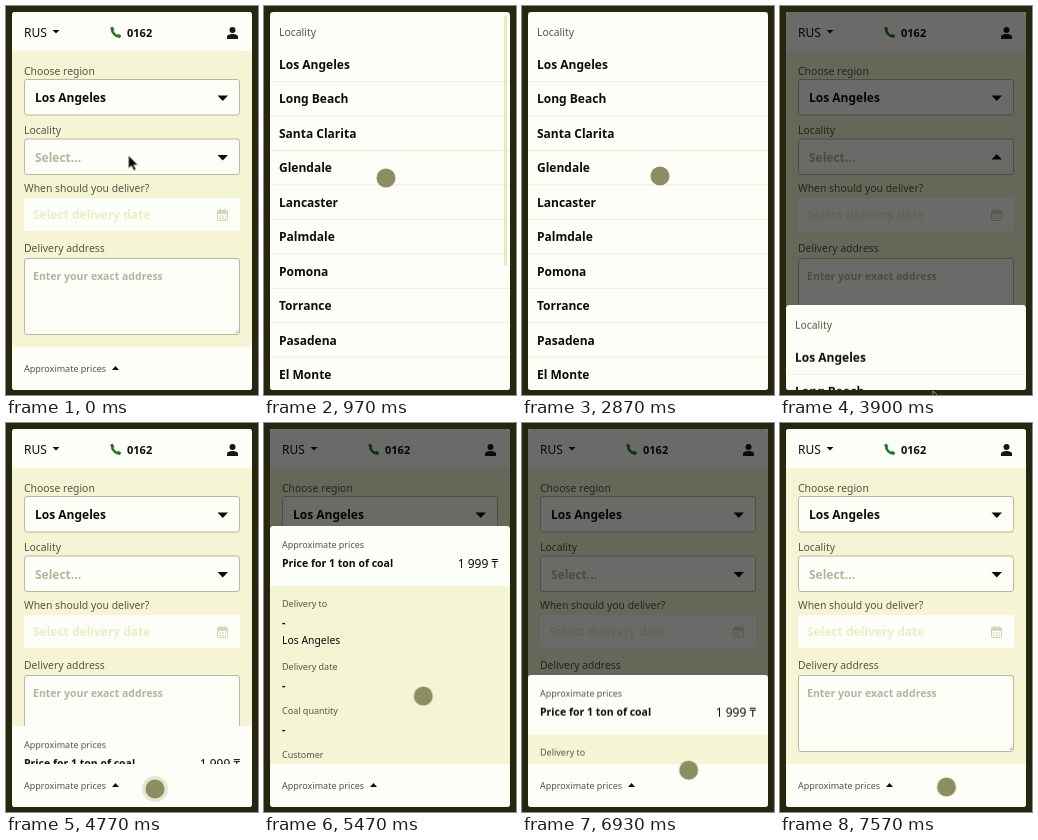
An HTML page for the animation above (7.76 s loop, 252x389 px).

```html
<!DOCTYPE html>
<html lang="en">
<head>
<meta charset="utf-8">
<title>Delivery form</title>
<style>
  html, body { margin: 0; width: 100%; height: 100%; overflow: hidden; background: #27270f; }
  svg { display: block; width: 252px; height: 389px; font-family: "Noto Sans", "Open Sans", sans-serif; }
  .page { fill: #f5f5d6; }
  .card { fill: #fefef8; }
  .box { fill: #fefef8; stroke: #b8b89a; }
  .ink { fill: #0c0c08; }
  .label { font-size: 10.4px; fill: #555546; }
  .small { font-size: 9px; fill: #555546; }
  .big { font-size: 12px; }
  .mid { font-size: 10.5px; }
  .bold { font-weight: 700; }
  .hint { fill: #b4b4a0; }
  .faint { fill: #ececc8; }
  .row { stroke: #efefd2; }

  .list, .price, .shade, .cursor, .arrow, .dot, .halo, .ring, .bar, .up, .down {
    animation: 7760ms linear infinite both;
  }
  .list { animation-name: list; }
  .price { animation-name: price; }
  .list-shade { animation-name: list-shade; }
  .price-shade { animation-name: price-shade; }
  .bar { animation-name: bar; }
  .cursor { animation-name: move; }
  .arrow { animation-name: arrow; animation-timing-function: step-end; }
  .dot { animation-name: dot; animation-timing-function: step-end; }
  .up { animation-name: up; animation-timing-function: step-end; }
  .down { animation-name: down; animation-timing-function: step-end; }
  .halo { animation-name: halo; }
  .ring { animation-name: ring; }

  /* Sheets: slide in, get dragged down, then finish closing */
  @keyframes list {
    0%, 5.15% { transform: translateY(378px); animation-timing-function: ease; }
    9.66%, 41.24% { transform: translateY(0); animation-timing-function: ease-in; }
    48.71% { transform: translateY(200px); }
    50.26% { transform: translateY(292px); animation-timing-function: ease-out; }
    52.19%, 100% { transform: translateY(378px); }
  }
  @keyframes price {
    0%, 60.6% { transform: translateY(238px); animation-timing-function: ease; }
    67.04%, 81.6% { transform: translateY(0); animation-timing-function: ease-in-out; }
    91.49% { transform: translateY(165px); animation-timing-function: ease-out; }
    97.16%, 100% { transform: translateY(238px); }
  }
  @keyframes list-shade {
    0%, 5.15% { opacity: 0; }
    9.02%, 50.3% { opacity: .58; }
    53.48%, 100% { opacity: 0; }
  }
  @keyframes price-shade {
    0%, 61.5% { opacity: 0; }
    65.72%, 91.49% { opacity: .58; }
    97.16%, 100% { opacity: 0; }
  }
  @keyframes bar {
    0%, 16.75% { opacity: 1; }
    20.6%, 100% { opacity: 0; }
  }
  @keyframes move {
    0%, 2.58% { transform: translate(122.5px, 149.5px); animation-timing-function: ease-in-out; }
    10.5%, 12.5% { transform: translate(122px, 172px); animation-timing-function: ease-in-out; }
    36.98%, 41.24% { transform: translate(138px, 170px); animation-timing-function: ease-in; }
    48.71% { transform: translate(152px, 370px); }
    50.26%, 51.55% { transform: translate(153px, 385px); animation-timing-function: ease-in-out; }
    59.28%, 64.43% { transform: translate(149px, 366px); animation-timing-function: ease-in-out; }
    76.03%, 81.6% { transform: translate(168px, 194px); animation-timing-function: ease-in-out; }
    91.49%, 100% { transform: translate(166.5px, 364px); }
  }
  @keyframes arrow {
    0% { opacity: 1; }
    2.58% { opacity: 0; }
    49.9% { opacity: 1; }
    53.4%, 100% { opacity: 0; }
  }
  @keyframes dot {
    0% { opacity: 0; }
    2.58% { opacity: 1; }
    49.9% { opacity: 0; }
    53.4%, 100% { opacity: 1; }
  }
  @keyframes up {
    0% { opacity: 0; }
    5.15% { opacity: 1; }
    52.19%, 100% { opacity: 0; }
  }
  @keyframes down {
    0% { opacity: 1; }
    5.15% { opacity: 0; }
    52.19%, 100% { opacity: 1; }
  }
  @keyframes halo {
    0%, 60.5% { opacity: 0; }
    61.2%, 61.8% { opacity: 1; }
    63%, 100% { opacity: 0; }
  }
  @keyframes ring {
    0%, 79.64% { opacity: 0; transform: scale(.5); }
    80.1% { opacity: 1; }
    80.6%, 81.6% { opacity: 1; transform: scale(1); }
    82.73%, 100% { opacity: 0; transform: scale(1.1); }
  }
</style>
</head>
<body>
<svg viewBox="0 0 252 389" xmlns="http://www.w3.org/2000/svg">
  <defs>
    <clipPath id="screen"><rect x="6" y="6" width="240" height="378" rx="3"/></clipPath>
    <clipPath id="content"><rect x="6" y="6" width="240" height="335"/></clipPath>
  </defs>
  <rect width="252" height="389" fill="#27270f"/>

  <g clip-path="url(#screen)">
    <rect class="page" x="6" y="6" width="240" height="378"/>

    <!-- Header -->
    <rect class="card" x="6" y="6" width="240" height="39"/>
    <text class="big ink" x="18" y="31">RUS</text>
    <path class="ink" d="M46.5 24h7l-3.5 3.5z"/>
    <path d="M106 22.5c-.4 4 3.6 8.3 7.6 8" fill="none" stroke="#1c7a26" stroke-width="2.4"/>
    <path d="M104 22l2.5-1.5 2 3.2-2 1.5zM110.5 29.5l1.7-1.8 3.1 2-1.5 2.5z" fill="#1c7a26"/>
    <text class="bold ink" font-size="11" x="121" y="31">0162</text>
    <circle cx="226.5" cy="24" r="3" fill="#1c1612"/>
    <path d="M221 33v-2.2c0-3.7 11-3.7 11 0V33z" fill="#1c1612"/>

    <!-- Form -->
    <text class="label" x="18" y="69">Choose region</text>
    <rect class="box" x="18.5" y="73.5" width="215" height="35.5" rx="2.5"/>
    <text class="big bold ink" x="29" y="96">Los Angeles</text>
    <path class="ink" d="M211.5 89.5h10.5l-5.25 5.5z"/>

    <text class="label" x="18" y="128">Locality</text>
    <rect class="box" x="18.5" y="133" width="215" height="35.5" rx="2.5"/>
    <text class="big bold hint" x="29" y="155.5">Select...</text>
    <path class="ink down" d="M211.5 149h10.5l-5.25 5.5z"/>
    <path class="ink up" d="M211.5 153.5h10.5l-5.25-5.5z"/>

    <text class="label" x="18" y="186">When should you deliver?</text>
    <rect class="card" x="18" y="192" width="216" height="33" rx="2.5"/>
    <text class="big bold faint" x="27" y="213">Select delivery date</text>
    <g fill="none" stroke="#d0d0b0">
      <rect x="211.5" y="204.5" width="10" height="10" rx="1"/>
      <path d="M211.5 206.5h10" stroke-width="2.5"/>
      <path d="M214 202.5v3M219 202.5v3M213 210h7M213 212.5h7" stroke-dasharray="2 1"/>
    </g>

    <text class="label" x="18" y="245.5">Delivery address</text>
    <rect class="box" x="18.5" y="252.5" width="215" height="76" rx="2.5"/>
    <text class="mid bold hint" x="27" y="274">Enter your exact address</text>
    <path d="M229.5 327l3-3M231.5 327l1-1" stroke="#8e8d6a" stroke-width=".7"/>

    <rect class="shade price-shade" x="6" y="6" width="240" height="378"/>

    <!-- Price sheet -->
    <g clip-path="url(#content)">
      <g class="price">
        <rect class="page" x="6" y="103" width="240" height="240" rx="4"/>
        <path class="card" d="M6 163v-56q0-4 4-4h232q4 0 4 4v56z"/>
        <text class="small" x="18" y="125">Approximate prices</text>
        <text class="mid bold ink" x="18" y="144">Price for 1 ton of coal</text>
        <text class="big ink" x="234" y="145" text-anchor="end">1 999 ₸</text>
        <text class="small" x="18" y="184">Delivery to</text>
        <text class="mid bold ink" x="18" y="203">-</text>
        <text class="ink" font-size="10.4" x="18" y="221">Los Angeles</text>
        <text class="small" x="18" y="247">Delivery date</text>
        <text class="mid bold ink" x="18" y="266">-</text>
        <text class="small" x="18" y="291">Coal quantity</text>
        <text class="mid bold ink" x="18" y="310">-</text>
        <text class="small" x="18" y="335">Customer</text>
      </g>
    </g>

    <!-- Bottom bar -->
    <rect class="card" x="6" y="341" width="240" height="43"/>
    <text class="small" x="18" y="366">Approximate prices</text>
    <path class="ink" d="M106 364h7l-3.5-4z"/>

    <rect class="shade list-shade" x="6" y="6" width="240" height="378"/>

    <!-- Locality sheet -->
    <g class="list" id="list">
      <rect class="card" x="6" y="6" width="240" height="390" rx="4"/>
      <text class="label" x="15" y="29.5">Locality</text>
      <rect class="bar" x="240" y="10" width="3" height="250" rx="1.5" fill="#e9e9bc"/>
    </g>
  </g>

  <!-- Pointer -->
  <g class="cursor">
    <circle class="halo" r="13" fill="#e6e6d2"/>
    <circle class="ring" r="21.5" fill="none" stroke="#0c0c08" stroke-width="1.7"/>
    <circle class="dot" r="9.5" fill="#8d8d64"/>
    <path class="arrow" d="M0 0v13l3-2.8 2.2 4.8 2.3-1-2.2-4.6h4.2z" fill="#0c0c06" stroke="#f5f4d8" stroke-width=".6"/>
  </g>
</svg>
<script>
  const list = document.getElementById("list");
  const pitch = 34.47;
  const towns = ["Los Angeles", "Long Beach", "Santa Clarita", "Glendale", "Lancaster",
    "Palmdale", "Pomona", "Torrance", "Pasadena", "El Monte"];

  function add(tag, attrs, text = "") {
    const el = document.createElementNS("http://www.w3.org/2000/svg", tag);
    for (const key in attrs) el.setAttribute(key, attrs[key]);
    el.textContent = text;
    list.insertBefore(el, list.lastElementChild);
  }

  towns.forEach((town, i) => {
    const y = i * pitch;
    add("text", { class: "big bold ink", x: 15, y: 63 + y }, town);
    add("line", { class: "row", x1: 6, x2: 246, y1: 75.5 + y, y2: 75.5 + y });
  });
</script>
</body>
</html>
```
